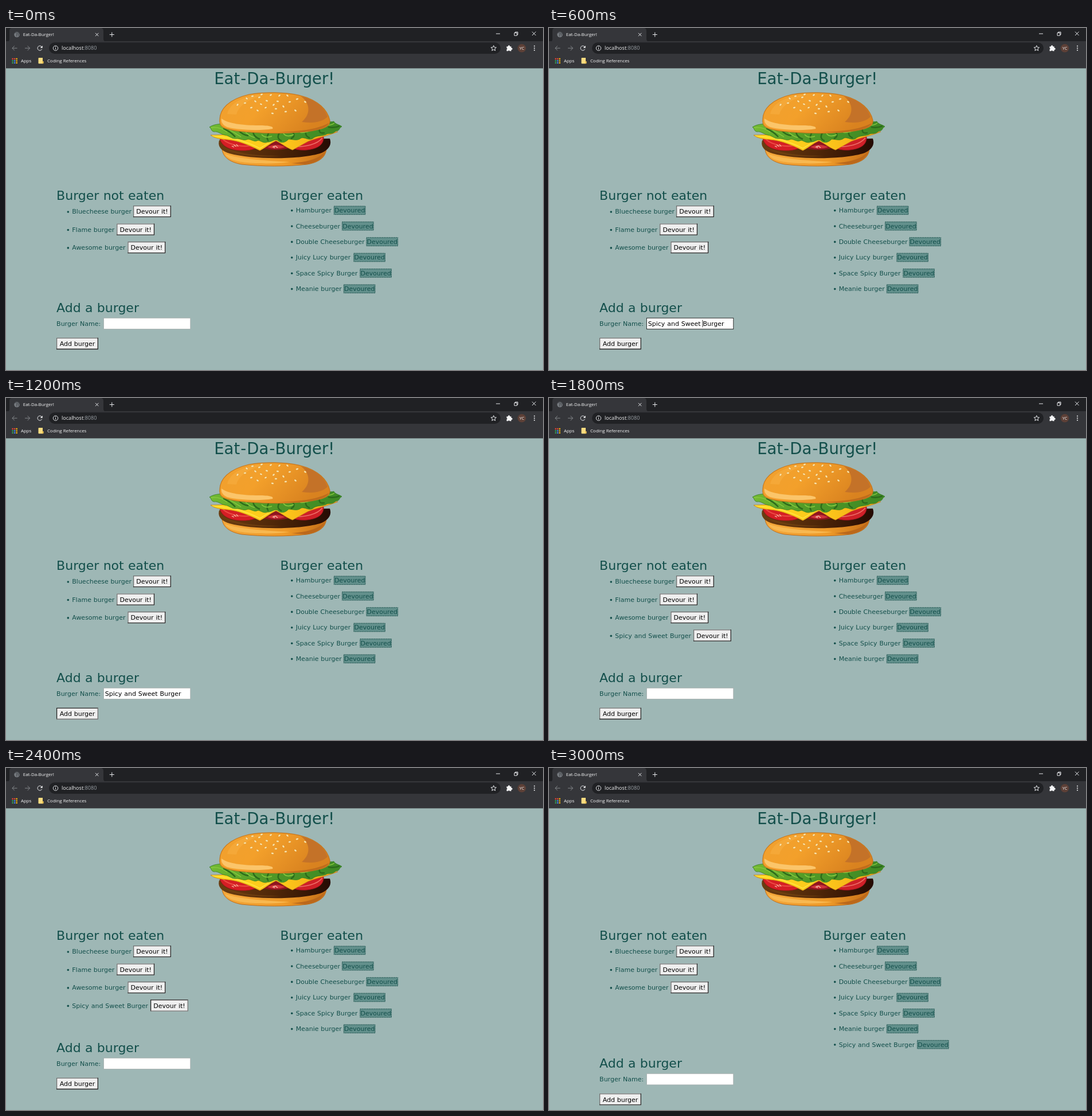
Animation, 937 px wide and 597 px high, one loop 3.6 s. Source, as an HTML page:

```html
<!DOCTYPE html>
<html lang="en">
<head>
<meta charset="utf-8">
<title>Eat-Da-Burger!</title>
<style>
  html, body { margin: 0; width: 100%; height: 100%; overflow: hidden; background: #9eb7b5; }
  svg { display: block; width: 937px; height: 597px; }
  text { white-space: pre; }
  .page { font: 11px "DejaVu Sans", Verdana, sans-serif; word-spacing: .03em; fill: #134f4b; }
  .page .ink { fill: #000; }
  .page .label { fill: #000; text-anchor: middle; }
  .h1 { font-size: 27.5px; }
  .h2 { font-size: 22px; }
  .ui { font: 7.9px "Open Sans", "Noto Sans", sans-serif; fill: #f4f5f6; }
  .ui .address { font-size: 9.1px; }
  .ui .initials { font-size: 7.4px; text-anchor: middle; }
  .line { fill: none; stroke: #e8eaed; stroke-width: 1; }
</style>
</head>
<body>
<svg viewBox="0 0 937 597" xmlns="http://www.w3.org/2000/svg">
  <defs>
    <linearGradient id="bun" x1="0" x2="1" y1="0" y2=".35">
      <stop offset="0" stop-color="#f0a02f"/><stop offset=".45" stop-color="#f3a02b"/><stop offset="1" stop-color="#d9821f"/>
    </linearGradient>
    <linearGradient id="base" x1="0" x2="1">
      <stop offset="0" stop-color="#f3a63a"/><stop offset=".6" stop-color="#ee9a28"/><stop offset="1" stop-color="#c56e18"/>
    </linearGradient>
    <linearGradient id="patty" x1="0" x2="1">
      <stop offset="0" stop-color="#6b3c10"/><stop offset=".5" stop-color="#4f2708"/><stop offset="1" stop-color="#250b03"/>
    </linearGradient>
    <linearGradient id="leaf" x1="0" x2="1">
      <stop offset="0" stop-color="#74bb32"/><stop offset=".4" stop-color="#519a27"/><stop offset="1" stop-color="#3d8825"/>
    </linearGradient>
    <linearGradient id="cheese" x1="0" x2="1">
      <stop offset="0" stop-color="#ffd91f"/><stop offset=".6" stop-color="#fcc51a"/><stop offset="1" stop-color="#eda416"/>
    </linearGradient>
  </defs>

  <g id="browser" class="ui">
    <rect width="937" height="24" fill="#202124"/>
    <rect y="23" width="937" height="47.4" fill="#35363a"/>
    <path d="M2 24Q6 24 6 19V5Q6 0 11 0H165Q170 0 170 5V19Q170 24 175 24Z" fill="#35363a"/>
    <circle cx="19" cy="11.5" r="4.8" fill="#777b80"/>
    <path d="M15 9l3-1 2 2-2 2 1 3M20 7l3 3-2 2 1 2" fill="none" stroke="#4b4e52" stroke-width="1.2"/>
    <text x="29.8" y="14">Eat-Da-Burger!</text>
    <path class="line" d="M156 8.8l5.4 5.4m0-5.4l-5.4 5.4M180.8 11.5h8M184.8 7.5v8"/>
    <path class="line" d="M855 10h7M887 8.5h4.7v4.7H887ZM888.4 8.5V7H893v4.7h-1.3M918 6.5l6.5 6.5m0-6.5L918 13"/>
    <path class="line" d="M19.5 35.2H11M14.8 31.2l-4 4 4 4M33 35.2h8.5M37.6 31.2l4 4-4 4" style="stroke:#85888c"/>
    <path class="line" d="M62.4 33A4 4 0 1 0 62.7 36.8"/>
    <path d="M63.7 30.7v4h-4Z"/>
    <rect x="75" y="25.3" width="788" height="19.6" rx="9.8" fill="#202124"/>
    <circle class="line" cx="86.5" cy="35.2" r="4.2"/>
    <path class="line" d="M86.5 34.5v3M86.5 32.3v1.2"/>
    <text x="97" y="38.4" class="address">localhost<tspan fill="#9aa0a6">:8080</tspan></text>
    <path class="line" d="M850.8 30.6l1.3 3.1 3.4.3-2.6 2.2.8 3.3-2.9-1.8-2.9 1.8.8-3.3-2.6-2.2 3.4-.3Z"/>
    <path d="M873.5 32.2h2.7a1.5 1.5 0 1 1 2.8 0h2.6v2.7a1.5 1.5 0 1 1 0 2.8v2.5h-2.7a1.5 1.5 0 0 0-2.8 0h-2.6v-2.6a1.5 1.5 0 0 0 0-2.8Z"/>
    <circle cx="900" cy="35.3" r="7.3" fill="#5d4037"/>
    <text x="900" y="38.1" class="initials">YC</text>
    <circle cx="922" cy="31.6" r="1"/><circle cx="922" cy="35.2" r="1"/><circle cx="922" cy="38.8" r="1"/>
    <g id="apps"></g>
    <text x="25.9" y="60">Apps</text>
    <path d="M56.5 53q0-1 1-1h6.5v6h1.2v3.2q0 1-1 1h-6.7q-1 0-1-1Z" fill="#fbdc80"/>
    <path d="M63 58h2.4v4H63Z" fill="#e9bf50"/>
    <text x="71.9" y="60">Coding References</text>
  </g>

  <g id="burger" stroke-linejoin="round">
    <path d="M377 207C376 224 389 234 411 238C448 242 489 242 526 238C548 234 560 224 559 207Z" fill="url(#base)" stroke="#bd6c1b"/>
    <path d="M382 220C388 231 409 235 436 236C460 237 477 236 495 234C460 232 409 229 382 220Z" fill="#f8b850"/>
    <path d="M498 236C525 234 544 229 556 217C551 230 539 236 522 238Z" fill="#bb681b"/>
    <path d="M372 196C369 207 375 214 390 219C430 230 511 230 548 219C563 213 569 204 565 193Z" fill="url(#patty)"/>
    <path d="M379 208C412 222 450 223 480 223C440 227 394 222 379 208Z" fill="#754411" opacity=".65"/>
    <path d="M373 193C376 207 392 215 418 214C435 213 444 207 446 198L420 188Z" fill="#d51e25" stroke="#8e1118" stroke-width=".8"/>
    <path d="M378 194C390 205 417 210 440 203" fill="none" stroke="#ec4a43" stroke-width="2"/>
    <path d="M397 204l5 3M402 203l3 4M394 206l4 2" stroke="#f7c7ae" stroke-width="1.2"/>
    <path d="M492 202C496 213 518 216 536 211C550 207 555 199 554 190L520 188Z" fill="#cf2028" stroke="#85101a" stroke-width=".8"/>
    <path d="M502 207C523 208 543 203 552 192" fill="none" stroke="#ee716a" stroke-width="1.6"/>
    <path d="M448 209C455 214 486 214 494 209L471 194Z" fill="#8d1520"/>
    <path d="M456 208Q471 200 487 208Q471 213 456 208Z" fill="#d0333a"/>
    <path d="M465 208l5-2 4 3M468 210v-4" fill="none" stroke="#f6d0b5" stroke-width="1.2"/>
    <path d="M357 187C383 187 406 184 430 181H515L579 181C562 188 542 192 527 198L500 213C491 210 480 201 471 197C460 202 453 209 443 214C425 205 407 197 386 195C373 194 363 192 357 187Z" fill="url(#cheese)" stroke="#c87c12" stroke-width=".8"/>
    <path d="M360 188C393 191 415 196 443 210L468 195" fill="none" stroke="#ffe94a" stroke-width="1.1"/>
    <path d="M355 173C366 166 375 169 384 165H552C561 162 567 165 572 163C574 168 583 169 586 172C580 175 584 179 575 180C569 187 563 182 558 186C550 189 542 187 535 193C528 197 522 190 515 192C508 198 500 194 493 194C488 200 480 202 474 196C468 193 463 200 456 199C450 202 445 197 440 196C433 200 428 194 422 194C414 198 409 192 402 193C393 194 389 187 382 187C374 185 370 180 363 181C357 180 359 175 355 173Z" fill="url(#leaf)" stroke="#347b22" stroke-width=".8"/>
    <g fill="none" stroke="#2c6b1b" stroke-width="2.6">
      <path d="M379 176Q391 180 400 190M405 178Q413 187 423 188M431 181Q432 190 443 194M459 182Q453 193 458 197M477 183Q471 193 481 197M501 182Q505 190 497 193M524 178Q520 188 530 192M547 176Q545 185 556 183M562 173Q573 175 582 171"/>
    </g>
    <g fill="none" stroke="#8acb40" stroke-width="1.4">
      <path d="M358 174Q374 172 386 182M390 178Q401 184 410 190M418 182Q427 190 434 191M446 186Q452 193 464 189M484 184Q490 192 502 186M513 182Q520 184 534 178M553 170Q566 171 573 166"/>
    </g>
    <path d="M373 164C371 141 390 124 424 116C449 111.500 489 111.500 514 118C545 126 561 143 565 161C567 174 547 178 523 181C488 185 441 184 406 180C384 177 373 174 373 164Z" fill="url(#bun)" stroke="#c4761e" stroke-width="1.2"/>
    <path d="M386 150C390 132 413 118 451 116C422 124 406 136 402 151Z" fill="#f7b042" opacity=".55"/>
    <path d="M514 119C541 125 556 139 561 155C552 164 536 167 516 164C535 148 528 128 514 119Z" fill="#c47228"/>
    <path d="M376 158C387 167 414 170 441 170C459 170 468 172 465 176C442 180 405 178 386 173C379 170 375 165 376 158Z" fill="#fbc56a"/>
    <path d="M475 181C515 181 545 176 563 166C557 179 520 184 475 181Z" fill="#bf6c1c"/>
    <g id="seeds" fill="#fde7af" stroke="#c98524" stroke-width=".35"></g>
  </g>

  <g id="page" class="page"></g>
</svg>
<script>
const $ = id => document.getElementById(id);
const STEP = 600, STEPS = 6;
const NEW = "Spicy and Sweet Burger";

const text = (x, y, s, cls = "") => `<text x="${x}" y="${y}" class="${cls}">${s}</text>`;
const rect = (x, y, w, h, attrs) => `<rect x="${x}" y="${y}" width="${w}" height="${h}" ${attrs}/>`;
const path = (d, stroke, w) => `<path d="${d}" fill="none" stroke="${stroke}" stroke-width="${w}"/>`;
const dot = (x, y) => `<circle cx="${x}" cy="${y}" r="1.8"/>`;

// Outset border, inset while pressed
function button(x, y, w, label, pressed) {
  const r = x + w, b = y + 20.4;
  const [lit, shade] = pressed ? ["#222", "#6f6f6f"] : ["#6f6f6f", "#222"];
  return rect(x, y, w, 20.4, 'fill="#efefef"') +
    path(`M${x + .6} ${b}V${y + .6}H${r}`, lit, 1.3) +
    path(`M${x} ${b - .7}H${r - .7}V${y}`, shade, 1.3) +
    text(x + w / 2, y + 14.3, label, "label");
}

function uneaten([name, x], i, pressed) {
  const y = 310 + i * 31.45;
  return dot(108.3, y + 11) + text(115.3, y + 14.3, name) + button(x, y, 66, "Devour it!", pressed);
}

function eaten([name, x], i) {
  const y = 310.6 + i * 27.4;
  return dot(498.8, y + 8) + text(505.7, y + 11.5, name) +
    rect(x + .4, y + .4, 54.6, 14.6, 'fill="#62908c" stroke="#174d49" stroke-width="1" stroke-dasharray="2 1"') +
    text(x + 1, y + 11.5, "Devoured");
}

function form(y, typed, focus, pressed) {
  const border = focus ? "#222" : "#a9b0af";
  return text(88.1, y, "Add a burger", "h2") +
    text(88.1, y + 24, "Burger Name:") +
    rect(170.4, y + 10.3, 151.4, 19.3, `fill="#fff" stroke="${border}" stroke-width=".9"`) +
    (typed ? text(172.8, y + 24, NEW, "ink") : "") +
    (focus ? path(`M268 ${y + 13.5}v13`, "#000", .8) : "") +
    button(88, y + 44.8, 73, "Add burger", pressed);
}

const waiting = [["Bluecheese burger", 222], ["Flame burger", 193.2], ["Awesome burger", 212.4]];
const done = [["Hamburger", 572], ["Cheeseburger", 586.2], ["Double Cheeseburger", 628.6],
  ["Juicy Lucy burger", 606.5], ["Space Spicy Burger", 617.5], ["Meanie burger", 589]];

function draw(step) {
  const left = step === 3 || step === 4 ? [...waiting, [NEW, 252]] : waiting;
  const right = step === 5 ? [...done, [NEW, 642.3]] : done;
  $("page").innerHTML =
    '<text x="363.2" y="97.8" class="h1">Eat<tspan dx="1.1">-</tspan><tspan dx="1.1">Da</tspan>' +
    '<tspan dx="1.1">-</tspan><tspan dx="1.1">Burger!</tspan></text>' +
    text(88.1, 300, "Burger not eaten", "h2") +
    text(478.4, 300, "Burger eaten", "h2") +
    left.map((b, i) => uneaten(b, i, step === 4 && i === 3)).join("") +
    right.map(eaten).join("") +
    form(step === 5 ? 523.4 : 496, step === 1 || step === 2, step === 1, step === 2);
}

const colors = ["#ea4335", "#ea4335", "#fbbc04", "#34a853", "#4285f4", "#fbbc04", "#34a853", "#4285f4", "#fbbc04"];
$("apps").innerHTML = colors.map((c, i) =>
  rect(10.5 + i % 3 * 3.5, 52.7 + Math.floor(i / 3) * 3.5, 2.3, 2.3, `fill="${c}"`)).join("");

const seeds = [[404, 134], [417, 131], [420, 123], [430, 119], [435, 128], [428, 139], [439, 144], [442, 121],
  [445, 133], [453, 139], [455, 127], [462, 117], [465, 149], [467, 134], [474, 128], [477, 118], [471, 141],
  [484, 137], [488, 146], [491, 118], [495, 129], [505, 144], [508, 124], [522, 129], [446, 116]];
$("seeds").innerHTML = seeds.map(([x, y], i) =>
  `<ellipse cx="${x}" cy="${y}" rx="2.4" ry="1.5" transform="rotate(${(i * 47) % 100 - 50} ${x} ${y})"/>`).join("");

let shown = -1;
function tick(now) {
  const step = Math.floor(now / STEP) % STEPS;
  if (step !== shown) draw(shown = step);
  requestAnimationFrame(tick);
}
tick(performance.now());
</script>
</body>
</html>
```
